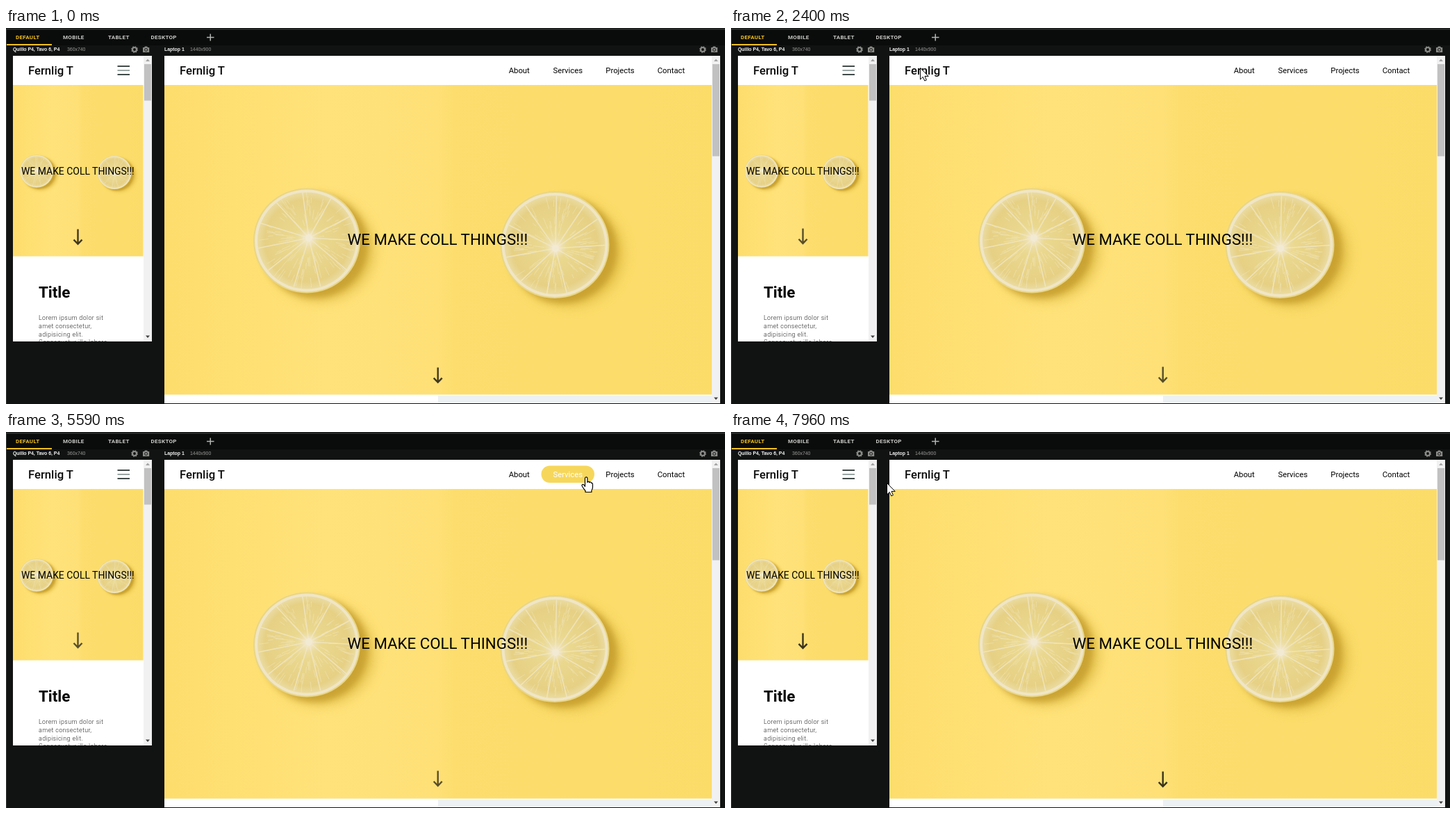
These frames come from a looping animation (1035 by 541 pixels, 8000 ms). An HTML page:

```html
<!DOCTYPE html>
<html lang="en">
<head>
<meta charset="utf-8">
<title>Responsive preview</title>
<style>
html, body { margin: 0; width: 100%; height: 100%; overflow: hidden; background: #111312; }
svg { display: block; width: 1035px; height: 541px; }
text { font-family: Roboto, sans-serif; white-space: pre; }
.tab { font: 700 8px Roboto, sans-serif; letter-spacing: .3px; fill: #c9cac6; }
.label { font: 700 6.9px "Liberation Sans", sans-serif; fill: #f4f4f4; }
.size { font: 400 6.9px "Liberation Sans", sans-serif; fill: #9a9a98; }
.brand { font-weight: 500; font-size: 16.7px; fill: #0b0b0b; }
.nav { font-size: 11.3px; fill: #000; text-anchor: middle; }
.body { font-weight: 300; font-size: 8.9px; letter-spacing: .4px; fill: #222; }
</style>
</head>
<body>
<svg viewBox="0 0 1035 541">
  <defs>
    <linearGradient id="wall">
      <stop offset="0" stop-color="#fddd6c"/>
      <stop offset=".3" stop-color="#ffe27a"/>
      <stop offset=".5" stop-color="#fee077"/>
      <stop offset=".53" stop-color="#fcdd6d"/>
      <stop offset="1" stop-color="#fcdc69"/>
    </linearGradient>
    <radialGradient id="flesh">
      <stop offset="0" stop-color="#eee2b4"/>
      <stop offset=".3" stop-color="#ead88f"/>
      <stop offset=".85" stop-color="#e6d084"/>
      <stop offset="1" stop-color="#eadba0"/>
    </radialGradient>
    <filter id="blur" x="-40%" y="-40%" width="180%" height="180%"><feGaussianBlur stdDeviation="9"/></filter>
    <filter id="soft" x="-40%" y="-40%" width="180%" height="180%"><feGaussianBlur stdDeviation="4"/></filter>
    <clipPath id="phoneHero"><rect x="10" y="82" width="187.5" height="246.5"/></clipPath>
    <clipPath id="deskHero"><rect x="228" y="82" width="788" height="445.5"/></clipPath>
    <clipPath id="phonePage"><rect x="10" y="40" width="188" height="411"/></clipPath>
    <g id="lemons"></g>
    <g id="tools" fill="none" stroke="#8b8c88">
      <circle r="3" stroke-width="2.2"/>
      <circle r="4.3" stroke-width="1.2" stroke-dasharray="1.7 1.68"/>
      <path d="M12 -3H14L15 -4.4H18L19 -3H21.2V4H12Z" fill="#8b8c88" stroke="none"/>
      <circle cx="16.6" cy=".4" r="2" stroke="#191b1a" stroke-width="1"/>
    </g>
    <path id="down" d="M0 0V21.5M-6 15.2L0 21.5L6 15.2" fill="none" stroke="#000" stroke-width="2.4"/>
  </defs>

  <rect width="1035" height="541" fill="#111312"/>
  <rect y="2" width="1035" height="23" fill="#0a0c0b"/>
  <rect y="1" width="1035" height="1.5" fill="#323433"/>
  <rect y="2" width="1" height="539" fill="#343635"/>
  <rect x="1" y="23" width="65" height="2" fill="#f2c01e"/>
  <g id="tabs"></g>
  <path d="M289 13.5H299.500M294.250 8.500V18.500" stroke="#b4b5b2" stroke-width="1.5"/>
  <text class="label" x="10" y="33">Quillo P4, Tavo 6, P4</text>
  <text class="size" x="88" y="33">360x740</text>
  <text class="label" x="228" y="33">Laptop 1</text>
  <text class="size" x="265" y="33">1440x900</text>
  <use href="#tools" x="185" y="31"/>
  <use href="#tools" x="1003" y="31"/>

  <rect x="10" y="40" width="200" height="411" fill="#fff"/>
  <g clip-path="url(#phoneHero)">
    <rect x="10" y="82" width="188" height="247" fill="url(#wall)"/>
    <use href="#lemons" transform="translate(44 206) scale(.314) translate(-433 -306)"/>
  </g>
  <text class="brand" x="32" y="67">Fernlig T</text>
  <path d="M160.500 55H178M160.500 67H178" stroke="#414a49" stroke-width="1.8"/>
  <path d="M160.500 61H178" stroke="#7f8f8c" stroke-width="1.6"/>
  <text x="22" y="211" font-size="13.950">WE MAKE COLL THINGS!!!</text>
  <g clip-path="url(#phonePage)">
    <text x="47" y="388" font-size="22.4" font-weight="600">Title</text>
    <g id="copy"></g>
  </g>

  <rect x="228" y="40" width="800" height="500" fill="#fff"/>
  <rect x="622" y="529" width="394" height="11" fill="#edf1f4"/>
  <g clip-path="url(#deskHero)">
    <rect x="228" y="82" width="788" height="446" fill="url(#wall)"/>
    <use href="#lemons"/>
  </g>
  <text class="brand" x="250" y="67">Fernlig T</text>
  <g id="nav"></g>
  <text x="491.500" y="312" font-size="22.270">WE MAKE COLL THINGS!!!</text>

  <g id="bars"></g>
  <use class="hint" href="#down" x="103.500" y="287"/>
  <use class="hint" href="#down" x="621.700" y="486"/>

  <g id="cursor" stroke="#000" fill="#fff" stroke-linejoin="round">
    <path id="pointer" stroke-width="1" d="M0 0V16.500L3.800 12.900L6.300 18.500L8.900 17.400L6.500 11.900H11.700Z"/>
    <path id="hand" stroke-width="1.2" d="M-2 1.300Q-2 -.6 -.3 -.6T1.400 1.300V7Q1.600 5.700 3 5.800T4.300 7.300Q4.700 6.300 5.900 6.500T7 8.100Q8.800 7.300 9 9.500V14Q9 16.500 7.400 18.500V21H-1.500V19Q-4.200 16 -6.300 12.300Q-7 10.800 -5.700 10.100T-3.300 11L-2 12.800Z"/>
  </g>
</svg>
<script>
const $ = id => document.getElementById(id);
const LOOP = 8000, BOUNCE = 1240, LOWEST = 273;

function seeded(s) {
  return () => (s = (s * 16807) % 2147483647) / 2147483647;
}

function lemon(cx, cy, rx, ry, ox, oy, seed) {
  const rnd = seeded(seed);
  const at = (a, k) => [
    (cx + ox * (1 - k) + Math.cos(a) * rx * k).toFixed(1),
    (cy + oy * (1 - k) + Math.sin(a) * ry * k).toFixed(1)
  ].join(' ');
  let pith = '', hairs = '';
  for (let i = 0; i < 11; i++) {
    const a = (i + rnd() * .4) * Math.PI * 2 / 11;
    pith += `M${at(a, 0)}L${at(a, .92)}`;
  }
  for (let i = 0; i < 120; i++) {
    const a = rnd() * Math.PI * 2, k = .2 + rnd() * .55;
    hairs += `M${at(a, k)}L${at(a + (rnd() - .5) * .05, k + .08 + rnd() * .15)}`;
  }
  return `<ellipse cx="${cx + 20}" cy="${cy + 13}" rx="${rx}" ry="${ry - 2}" fill="#d2ad31" opacity=".62" filter="url(#blur)"/>
    <ellipse cx="${cx + 11}" cy="${cy + 7}" rx="${rx}" ry="${ry}" fill="#b98f22" opacity=".6" filter="url(#soft)"/>
    <ellipse cx="${cx}" cy="${cy}" rx="${rx}" ry="${ry}" fill="#e9d686"/>
    <ellipse cx="${cx}" cy="${cy}" rx="${rx - 2}" ry="${ry - 2}" fill="#f0e6c6"/>
    <ellipse cx="${cx}" cy="${cy}" rx="${rx - 6}" ry="${ry - 6}" fill="url(#flesh)"/>
    <path d="${hairs}" stroke="#f3e9c4" stroke-width="1" opacity=".5"/>
    <path d="${pith}" stroke="#f1e7c6" stroke-width="1.6" opacity=".8"/>
    <circle cx="${cx + ox}" cy="${cy + oy}" r="8" fill="#f3ead4" filter="url(#soft)"/>
    <circle cx="${cx + ox}" cy="${cy + oy}" r="5" fill="#f3ead4"/>`;
}
$('lemons').innerHTML =
  lemon(433, 306, 77, 75.5, 3, -4, 71) +
  lemon(790, 312, 78.5, 77, 1, 5, 905);

$('tabs').innerHTML = [['DEFAULT', 14], ['MOBILE', 82], ['TABLET', 147], ['DESKTOP', 208.500]]
  .map(([s, x], i) => `<text class="tab" x="${x}" y="15.500"${i ? '' : ' style="fill:#f2c01e"'}>${s}</text>`).join('');

$('copy').innerHTML = ['Lorem ipsum dolor sit', 'amet consectetur,', 'adipisicing elit.', 'Consequatur illo labore']
  .map((s, i) => `<text class="body" x="47" y="${420 + i * 11.8}">${s}</text>`).join('');

const links = [['About', 707, 770.500], ['Services', 770.500, 847], ['Projects', 847, 921], ['Contact', 921, 994]];
$('nav').innerHTML = links.map(([s, l, r]) =>
  `<g><rect x="${l}" y="48.500" width="${r - l}" height="24.500" rx="12.250" fill="#f6d75b"/>
   <text class="nav" x="${(l + r) / 2}" y="65">${s}</text></g>`).join('');
const items = [...$('nav').children];

const bar = (x, bottom, thumb) =>
  `<rect x="${x}" y="40" width="12" height="${bottom - 40}" fill="#f1f1f1"/>
   <rect x="${x + 1}" y="52" width="10" height="${thumb}" fill="#c1c1c1"/>
   <path d="M${x + 3} 48h6l-3 -3.500z" fill="#a3a3a3"/>
   <path d="M${x + 3} ${bottom - 8.500}h6l-3 3.500z" fill="#404040"/>`;
$('bars').innerHTML = bar(198, 451, 52.500) + bar(1016, 540, 132.500);

// time, x, y of the cursor tip
const track = [
  [520, 968, 541], [810, 848, 460], [1150, 610, 320], [1500, 417, 219], [1640, 350, 173],
  [2000, 262, 75], [2250, 245, 57], [2560, 300, 56], [2900, 430, 60], [3140, 537, 66],
  [3290, 616, 72], [3360, 638, 73], [3700, 700, 80], [4140, 737, 74], [4260, 745, 64],
  [4690, 747, 60], [4860, 770, 58], [4980, 795, 60], [5590, 835, 65], [5800, 841, 65],
  [6000, 880, 62], [6250, 925, 60], [6640, 975, 57], [6780, 980, 56], [6950, 965, 62],
  [7120, 880, 80], [7300, 730, 90], [7470, 600, 90], [7820, 291, 86], [7890, 252, 82], [7960, 224, 73]
];

function tipAt(t) {
  if (t < track[0][0]) return null;
  const i = track.findIndex(p => p[0] > t);
  if (i < 0) return track[track.length - 1].slice(1);
  const [t0, x0, y0] = track[i - 1], [t1, x1, y1] = track[i];
  const k = (t - t0) / (t1 - t0);
  return [x0 + (x1 - x0) * k, y0 + (y1 - y0) * k];
}

const show = (el, on) => el.setAttribute('visibility', on ? 'visible' : 'hidden');
const hints = document.querySelectorAll('.hint');

function draw(t) {
  const p = .5 + .5 * Math.cos((t - LOWEST) / BOUNCE * Math.PI * 2);
  hints.forEach(h => {
    h.setAttribute('transform', `translate(0 ${(p * 4).toFixed(2)})`);
    h.setAttribute('opacity', (.48 + .45 * p).toFixed(3));
  });

  const tip = tipAt(t);
  const [x, y] = tip || [0, 0];
  const over = y > 48 && y < 72.500 ? links.findIndex(([, l, r]) => x >= l && x < r) : -1;
  items.forEach((g, i) => {
    show(g.firstElementChild, i === over);
    g.lastElementChild.style.fill = i === over ? '#fff' : '#000';
  });
  $('cursor').setAttribute('transform', `translate(${Math.round(x) + .5} ${Math.round(y) + .5})`);
  show($('pointer'), tip && over < 0);
  show($('hand'), tip && over >= 0);
}

const start = performance.now();
function tick() {
  draw((performance.now() - start) % LOOP);
  requestAnimationFrame(tick);
}
tick();
</script>
</body>
</html>
```
